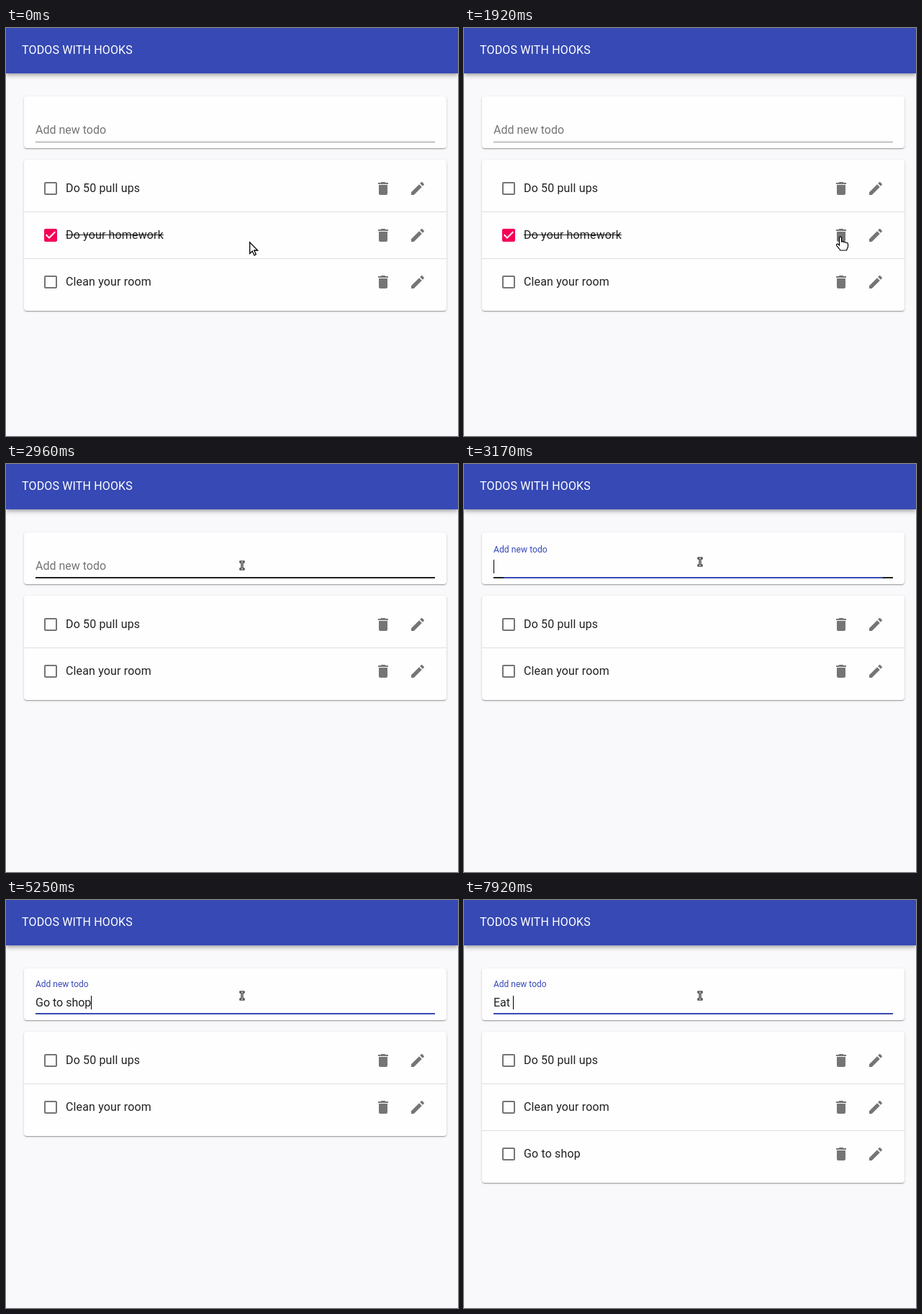
Recreate the animation shown at these times as an HTML page. Size 628 px wide and 567 px high, loop 8000 ms.

```html
<!DOCTYPE html>
<html lang="en">
<head>
<meta charset="utf-8">
<title>Todos</title>
<style>
  html, body { margin: 0; width: 100%; height: 100%; overflow: hidden; }
  body { position: relative; background: #f9f8fa; color: rgba(0,0,0,.87);
    font: 16px/24px Roboto, sans-serif; cursor: default; }
  div, svg { position: absolute; }
  span, div { white-space: pre; }
  .bar { left: 0; right: 0; top: -1px; height: 64px; background: #3649b4; color: #fff;
    box-shadow: 0 2px 4px -1px rgba(0,0,0,.2), 0 4px 5px rgba(0,0,0,.14), 0 1px 10px rgba(0,0,0,.12); }
  .title { left: 22px; top: 20px; letter-spacing: .15px; }
  .card { left: 25px; width: 587px; border-radius: 4px; background: #fffefe;
    box-shadow: 0 1px 3px rgba(0,0,0,.2), 0 1px 1px rgba(0,0,0,.14), 0 2px 1px -1px rgba(0,0,0,.12); }
  .line { left: 16px; width: 555px; }
  #label { left: 16px; top: 15px; line-height: 16px; transform-origin: 0 0; }
  #field { left: 16px; top: 38px; height: 19px; line-height: 19px; display: flex; }
  #caret { width: 1px; height: 19px; background: #000; }
  .row { left: 0; width: 587px; height: 64px; }
  .row.ruled::before { content: ""; position: absolute; top: -1px; width: 100%; height: 1px;
    background: rgba(0,0,0,.12); }
  .row .text { left: 58px; top: 20px; letter-spacing: .15px; }
  .row.done .text { text-decoration: line-through; }
  .row svg { top: 20px; width: 24px; height: 24px; fill: rgba(0,0,0,.54); }
  .row.done .box { fill: #f50057; }
  .halo { left: 475px; top: 8px; width: 48px; height: 48px; border-radius: 50%; background: rgba(0,0,0,.015); }
  #pointer { left: 0; top: 0; width: 100%; height: 100%; }
</style>
</head>
<body>
<div class="bar"><div class="title">TODOS WITH HOOKS</div></div>
<div class="card" style="top:95px;height:72px">
  <div id="label">Add new todo</div>
  <div id="field"><span id="typed"></span><span id="caret"></span></div>
  <div class="line" style="top:63px;height:1px;background:rgba(0,0,0,.42)"></div>
  <div class="line" id="hover" style="top:62px;height:2px;background:#202020"></div>
  <div class="line" id="focus" style="top:62px;height:2px;background:#3649b4"></div>
</div>
<div class="card" id="list" style="top:183px"></div>
<svg id="pointer">
  <g id="arrow"><path d="M.7 .9V16.4L4.3 13 7 18.9 9.4 17.8 6.8 12H11.7Z" fill="#fff" stroke="#000" stroke-width="1.3"/></g>
  <g id="hand"><path d="M-1.5 1.2Q0-.8 1.5 1.2V7Q4 6 4.8 7.7 7 6.8 7.9 8.6 10.5 8 10.5 10.5V14L8.5 19H0L-5.5 12Q-5.5 9.5-3 10.4L-1.5 12Z" fill="#fff" stroke="#000" stroke-width="1.2"/></g>
  <g id="beam" fill="none">
    <path d="M-3.5-5H3.5M-3.5 5H3.5M0-5V5" stroke="#000" stroke-width="3"/>
    <path d="M-2.5-5H2.5M-2.5 5H2.5M0-5V5" stroke="#fff"/>
  </g>
</svg>
<script>
const $ = id => document.getElementById(id);
const LOOP = 8000, FOCUS = 3030, HOVER = 2780, REMOVE = 2130, ADD = 6580, MOVING = 1290;

const icons = {
  empty: "M19 5v14H5V5h14m0-2H5c-1.1 0-2 .9-2 2v14c0 1.1.9 2 2 2h14c1.1 0 2-.9 2-2V5c0-1.1-.9-2-2-2z",
  checked: "M19 3H5c-1.1 0-2 .9-2 2v14c0 1.1.9 2 2 2h14c1.1 0 2-.9 2-2V5c0-1.1-.9-2-2-2zm-9 14l-5-5 1.4-1.4L10 14.2l7.6-7.6L19 8z",
  trash: "M6 19c0 1.1.9 2 2 2h8c1.1 0 2-.9 2-2V7H6zM19 4h-3.5l-1-1h-5l-1 1H5v2h14z",
  pencil: "M3 17.25V21h3.75L17.8 9.95 14.05 6.2zM20.7 7.05c.4-.4.4-1 0-1.4l-2.35-2.35c-.4-.4-1-.4-1.4 0L15.1 5.1l3.75 3.75z"
};

const todos = [
  { text: "Do 50 pull ups" },
  { text: "Do your homework", done: true, to: REMOVE },
  { text: "Clean your room" },
  { text: "Go to shop", from: ADD }
];

// time, text, caret visible
const typing = [
  [0, "", 0], [FOCUS, "", 1], [3630, "", 0], [3710, "G", 1], [3920, "Go", 1], [4040, "Go ", 1],
  [4210, "Go t", 1], [4330, "Go to", 1], [4630, "Go to s", 1], [4920, "Go to sh", 1],
  [5080, "Go to sho", 1], [5250, "Go to shop", 1], [5710, "Go to sho", 1], [5880, "Go to sho", 0],
  [6290, "Go to shop", 1], [ADD, "", 1], [7210, "", 0], [7380, "E", 1], [7580, "Ea", 1],
  [7790, "Eat", 1], [7920, "Eat ", 1]
];

// time, x, y; jumps up to MOVING, glides afterwards
const path = [
  [0, 338, 297], [380, 338, 296], [670, 341, 286], [790, 344, 274], [1000, 378, 260],
  [1080, 419, 288], [1210, 438, 297], [MOVING, 444, 299], [1460, 444, 299], [1800, 522, 291],
  [2200, 524, 288], [2290, 515, 286], [2380, 471, 280], [2500, 425, 253], [2650, 370, 200],
  [2800, 338, 157], [2960, 328, 141], [3090, 328, 141], [3210, 328, 133], [LOOP, 328, 133]
];

const clamp = v => Math.max(0, Math.min(1, v));
const lastBefore = (keys, t) => keys.findLastIndex(k => k[0] <= t);

// cubic-bezier(0, 0, .2, 1)
function easeOut(x) {
  let lo = 0, hi = 1;
  for (let i = 0; i < 20; i++) {
    const s = (lo + hi) / 2;
    if (.6 * s * s * (1 - s) + s ** 3 < x) lo = s; else hi = s;
  }
  return 3 * lo * lo * (1 - lo) + lo ** 3;
}

function pointerAt(t) {
  const i = lastBefore(path, t), [t0, x0, y0] = path[i];
  if (t < MOVING) return [x0, y0];
  const [t1, x1, y1] = path[i + 1], k = (t - t0) / (t1 - t0);
  return [Math.round(x0 + (x1 - x0) * k), Math.round(y0 + (y1 - y0) * k)];
}

const icon = (name, x, cls = "") =>
  `<svg class="${cls}" style="left:${x}px" viewBox="0 0 24 24"><path d="${icons[name]}"/></svg>`;

for (const todo of todos) {
  const row = todo.row = document.createElement("div");
  row.innerHTML = '<div class="halo"></div>' + icon(todo.done ? "checked" : "empty", 25, "box") +
    `<div class="text">${todo.text}</div>` + icon("trash", 487) + icon("pencil", 535);
  todo.halo = row.firstChild;
  $("list").append(row);
}

function drawList(t) {
  let n = 0;
  for (const todo of todos) {
    const { row, halo, done, from = 0, to = LOOP } = todo;
    const shown = t >= from && t < to;
    row.style.display = shown ? "" : "none";
    if (!shown) continue;
    row.className = "row" + (done ? " done" : "") + (n ? " ruled" : "");
    row.style.top = 8 + 65 * n + "px";
    halo.style.opacity = n === 1 && !done && t > 2200 ? clamp((2480 - t) / 100) : 0;
    n++;
  }
  $("list").style.height = 15 + 65 * n + "px";
}

function drawField(t) {
  const k = easeOut(clamp((t - FOCUS) / 200));
  $("label").style.transform = `translateY(${24 - 22.5 * k}px) scale(${1 - .25 * k})`;
  $("label").style.color = t < FOCUS ? "rgba(0,0,0,.54)" : "#3649b4";
  $("hover").style.opacity = k < 1 ? clamp((t - HOVER) / 150) : 0;
  $("focus").style.transform = `scaleX(${k})`;
  const [, text, caret] = typing[lastBefore(typing, t)];
  $("typed").textContent = text;
  $("caret").style.opacity = caret;
}

function drawPointer(t) {
  const [x, y] = pointerAt(t);
  const kind = y < 159 ? "beam" : Math.hypot(x - 524, y - 288) < 24 ? "hand" : "arrow";
  for (const id of ["arrow", "hand", "beam"]) {
    $(id).style.display = id === kind ? "" : "none";
  }
  $(kind).setAttribute("transform", `translate(${x} ${y})`);
}

const start = performance.now();
function frame() {
  const t = (performance.now() - start) % LOOP;
  drawList(t);
  drawField(t);
  drawPointer(t);
  requestAnimationFrame(frame);
}
frame();
</script>
</body>
</html>
```
